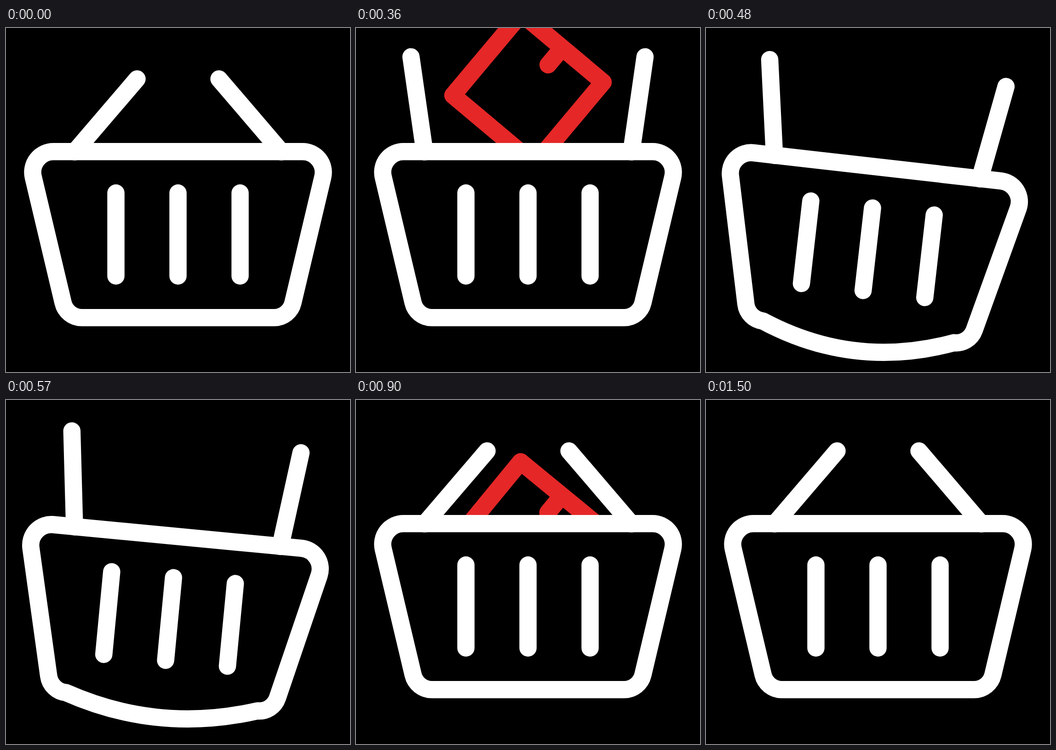
Write an HTML page that moves like this. It is 748 px wide and 748 px high and loops after 1800 ms.

```html
<!DOCTYPE html>
<html lang="en">
<head>
<meta charset="utf-8">
<title>Basket</title>
<style>
  html, body { margin: 0; width: 100%; height: 100%; overflow: hidden; background: #000; }
  svg { display: block; width: 100%; height: 100%; }
</style>
</head>
<body>
<svg viewBox="0 0 748 748" fill="none" stroke="#fff" stroke-width="37.5" stroke-linecap="round" stroke-linejoin="round">
  <clipPath id="rim"><rect x="-100" y="-400" width="948" height="650.5"/></clipPath>
  <g id="basket">
    <g clip-path="url(#rim)">
      <path id="card" stroke="#e52727" d="M-116-116H116V116H-116ZM0-116V-68"/>
    </g>
    <path id="left" d="M149.2 269.25L284.9 110.7"/>
    <path id="right" d="M598.8 269.25L463.1 110.7"/>
    <path id="body"/>
    <path d="M239 358.75V539.25M374 358.75V539.25M509 358.75V539.25"/>
  </g>
</svg>
<script>
const LOOP = 1800, STEP = 30;
const $ = id => document.getElementById(id);
const clamp = x => Math.min(1, Math.max(0, x));
const span = (t, a, b) => clamp((t - a) / (b - a));
const mix = (a, b, k) => a + (b - a) * k;

// cubic-bezier(.5, 0, .2, 1), solved by bisection
function ease(x) {
  let lo = 0, hi = 1;
  for (let i = 0; i < 24; i++) {
    const s = (lo + hi) / 2, r = 1 - s;
    if (1.5 * s * r * r + .6 * s * s * r + s * s * s < x) lo = s; else hi = s;
  }
  return lo * lo * (3 - 2 * lo);
}

function tiltAt(t) {
  const k = t < 520
    ? Math.sin(span(t, 405, 520) * Math.PI / 2)
    : (1 + Math.cos(span(t, 520, 660) * Math.PI)) / 2;
  return 7.6 * k;
}

// Drop in, bounce up to rest, then sink out of sight
function cardAt(t) {
  if (t < 520) {
    const fall = Math.max(0, t - 210);
    return { y: Math.min(470, -200 + .01476 * fall * fall), turn: 40 };
  }
  if (t < 1200) {
    const k = ease(span(t, 520, 754));
    return { y: mix(470, 297.5, k), turn: mix(15, 39.4, k) };
  }
  return { y: mix(297.5, 445, span(t, 1200, 1500) ** 1.5), turn: 39.4 };
}

function draw(t) {
  const open = 50 * ease(clamp(Math.min(t, 900 - t) / 450));
  const tilt = tiltAt(t), card = cardAt(t);
  $('left').setAttribute('transform', `rotate(${-open} 149.2 269.25)`);
  $('right').setAttribute('transform', `rotate(${open} 598.8 269.25)`);
  $('basket').setAttribute('transform', `rotate(${tilt} 79.6 269.5)`);
  $('card').setAttribute('transform', `translate(374 ${card.y}) rotate(${card.turn})`);
  // The floor bends as the card lands
  const dip = 629.75 + 2 * 6.38 * tilt;
  $('body').setAttribute('d', `M103 268.75H645A45 45 0 0 1 688.8 323.9L623.9 597.4
    A42 42 0 0 1 583 629.75Q374 ${dip} 165 629.75
    A42 42 0 0 1 124.1 597.4L59.2 323.9A45 45 0 0 1 103 268.75Z`);
}

let start;
function tick(now) {
  start ??= now;
  const t = (now - start + 1) % LOOP;
  draw(Math.floor(t / STEP) * STEP);
  requestAnimationFrame(tick);
}
draw(0);
requestAnimationFrame(tick);
</script>
</body>
</html>
```
